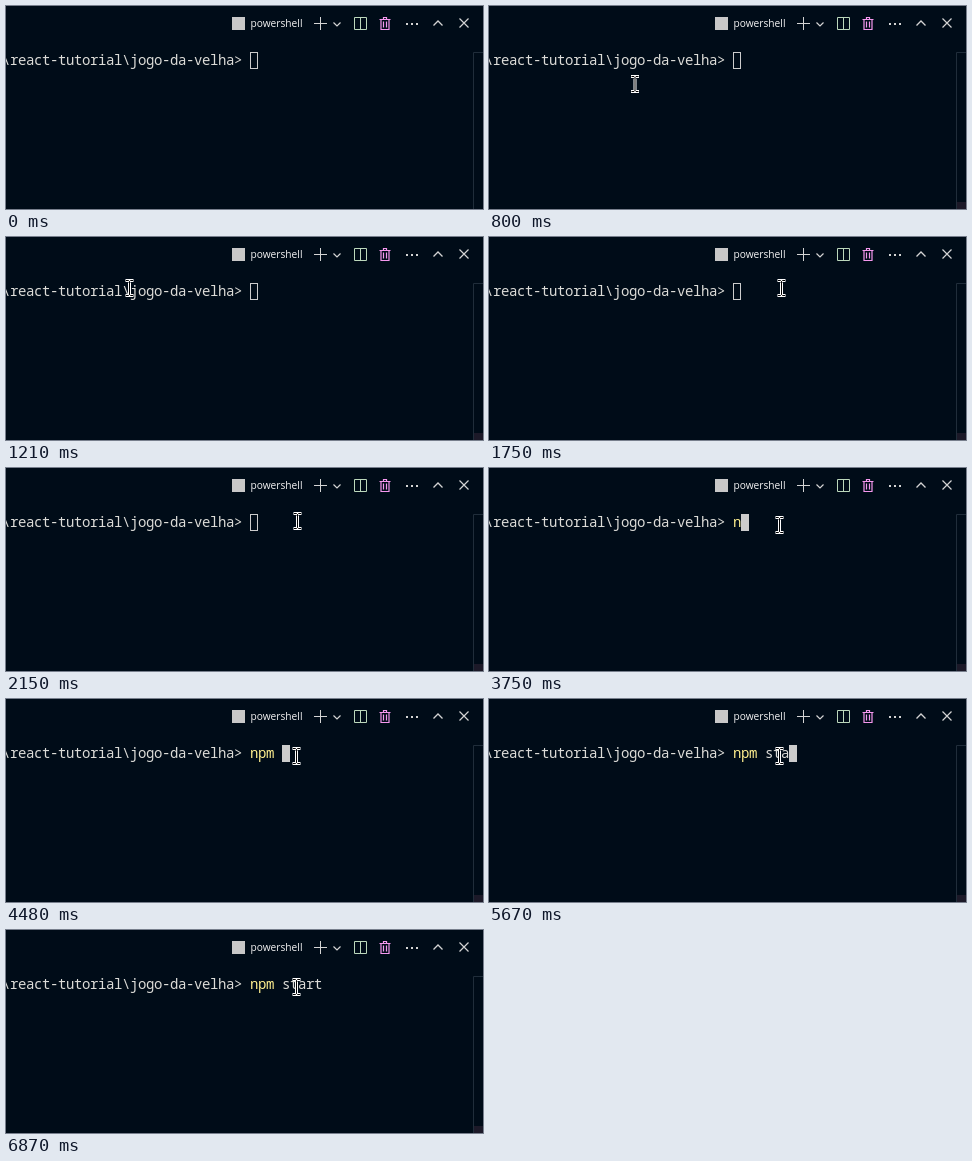
These frames come from a looping animation (477x203 px, 8 s). An HTML page:

```html
<!DOCTYPE html>
<html lang="pt">
<head>
<meta charset="utf-8">
<title>Terminal</title>
<style>
  html, body { margin: 0; width: 100%; height: 100%; overflow: hidden; background: #000c18; }
  svg { display: block; }
  .shell { font: 500 14px "Noto Sans Mono", monospace; letter-spacing: -0.4px; fill: #dcdcd8; white-space: pre; }
  .title { font: 500 10.2px "Open Sans", sans-serif; fill: #f4f4f4; }
  .icon { fill: none; stroke: #d4d4d4; }
</style>
</head>
<body>
<svg width="477" height="203" viewBox="0 0 477 203">
  <rect x="226" y="11" width="13" height="13" fill="#c8c8c8"/>
  <text class="title" x="244.5" y="20.5">powershell</text>

  <g class="icon">
    <path d="M314.5 11v13M308 17.5h13"/>
    <path d="M327.5 16.5l3.5 3.5 3.5-3.5" stroke-width="1.2"/>
    <path d="M348.5 11.5h12v12h-12zM354.5 11.5v12" stroke="#bcd8bc"/>
    <path d="M373.5 13.5h11M377.5 13v-1.5h3v1.5M375 13.5v10h8v-10M377.5 15.5v6M380.5 15.5v6" stroke="#f598ee" stroke-width="1.2"/>
    <path d="M427.5 19.5l4.5-4.5 4.5 4.5" stroke-width="1.3"/>
    <path d="M453.5 12.5l9 9M462.5 12.5l-9 9" stroke-width="1.2"/>
  </g>
  <path d="M400 17h2v2h-2zM405 17h2v2h-2zM410 17h2v2h-2z" fill="#d4d4d4"/>

  <path d="M477 46.5h-9.5V203" fill="none" stroke="#202d3a"/>
  <rect id="slider" x="468" y="196" width="9" height="7" fill="#1c1928"/>

  <text class="shell" x="-4" y="59">\react-tutorial\jogo-da-velha&gt;</text>
  <text class="shell" x="244" y="59"><tspan id="command" fill="#fff08f"></tspan><tspan id="argument"></tspan></text>
  <rect id="caret" y="46.5" width="7" height="16" stroke="#ccc"/>

  <g id="pointer" fill="none">
    <path d="M-4 -7.5h3l1 1 1-1h3M0 -6.5v13M-4 7.5h3l1-1 1 1h3" stroke="#fff" stroke-width="3"/>
    <path d="M-3.5 -7.5h2.5l1 1 1-1h2.5M0 -6.5v13M-3.5 7.5h2.5l1-1 1 1h2.5" stroke="#000"/>
  </g>
</svg>
<script>
const LOOP = 8000, ENTER = 530, FOCUS = 2210, BLUR = 6870;
const CHAR = 8, FPS = 15;

// Typing comes in bursts with an even rhythm.
const bursts = [
  { text: "npm ", start: 3420, gap: 350 },
  { text: "s", start: 5140, gap: 1 },
  { text: "tart", start: 5470, gap: 177 }
];

// Pointer glides: each eases out to its end point and then rests.
const origin = { x: 363, y: 175 };
const glides = [
  { start: ENTER, end: 800, x: 146, y: 78 },
  { start: 800, end: 1200, x: 123.5, y: 51 },
  { start: 1470, end: 1730, x: 292.5, y: 51 },
  { start: 1960, end: 2020, x: 297, y: 50 },
  { start: 2020, end: 2200, x: 290.5, y: 53 },
  { start: 2420, end: 2600, x: 290.5, y: 57 }
];

const $ = id => document.getElementById(id);
const clamp = (v, lo, hi) => Math.min(Math.max(v, lo), hi);
const easeOut = u => 1 - (1 - u) ** 2;
const show = (id, on) => $(id).setAttribute("visibility", on ? "visible" : "hidden");

function typedAt(t) {
  return bursts.map(({ text, start, gap }) =>
    text.slice(0, Math.max(0, Math.floor((t - start) / gap) + 1))).join("");
}

function pointerAt(t) {
  const sampled = Math.floor((t + 7) * FPS / 1000) * 1000 / FPS;
  return glides.reduce((from, { start, end, x, y }) => {
    const u = easeOut(clamp((sampled - start) / (end - start), 0, 1));
    return { x: from.x + (x - from.x) * u, y: from.y + (y - from.y) * u };
  }, origin);
}

function draw(t) {
  const typed = typedAt(t);
  $("command").textContent = typed.slice(0, 3);
  $("argument").textContent = typed.slice(3);

  $("caret").setAttribute("x", 244.5 + typed.length * CHAR);
  $("caret").setAttribute("fill", t >= FOCUS ? "#ccc" : "none");
  show("caret", t < BLUR);

  const { x, y } = pointerAt(t);
  $("pointer").setAttribute("transform", `translate(${Math.round(x * 2) / 2} ${Math.round(y)})`);
  show("pointer", t >= ENTER);
  show("slider", t >= ENTER);
}

const begin = performance.now();
function frame() {
  draw((performance.now() - begin) % LOOP);
  requestAnimationFrame(frame);
}
frame();
</script>
</body>
</html>
```
